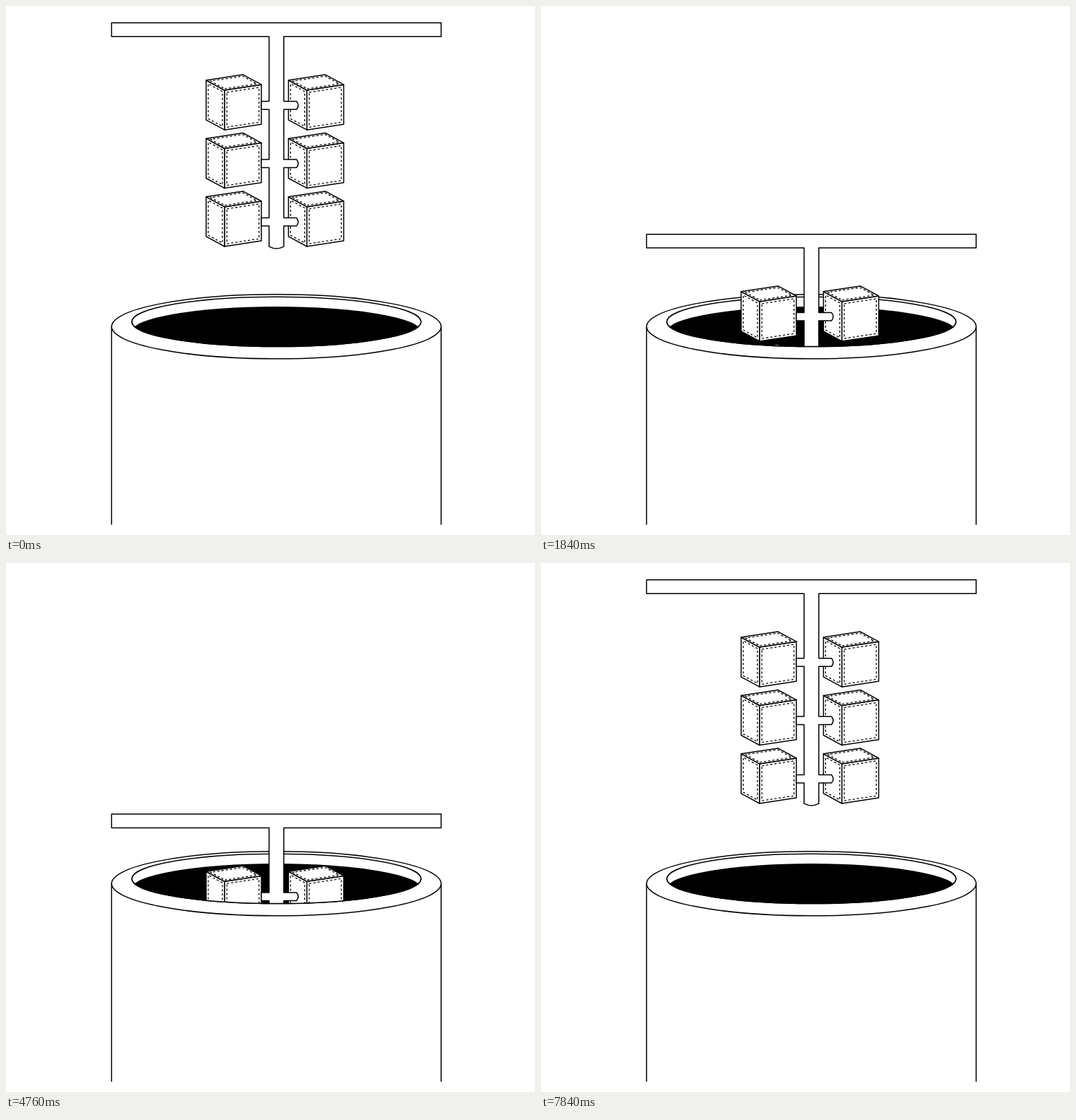
An HTML page for the animation above (9.04 s loop, 748 by 748 pixels).

```html
<!DOCTYPE html>
<html lang="en">
<head>
<meta charset="utf-8">
<title>Dipping rack</title>
<style>
  html, body { margin: 0; width: 100%; height: 100%; overflow: hidden; background: #fff; }
  svg { display: block; width: 100vw; height: 100vh; }
  .line { fill: #fff; stroke: #000; stroke-width: 1.5; stroke-linejoin: round; }
  .open { fill: none; stroke: #000; stroke-width: 1.5; }
  .stitch { fill: none; stroke: #000; stroke-width: 1.3; stroke-dasharray: 3 3; }
</style>
</head>
<body>
<svg viewBox="0 0 748 748">
  <defs>
    <clipPath id="mouth">
      <path d="M0 0H748V446.4H586.9A204.5 35.2 0 0 1 177.9 446.4H0Z"/>
    </clipPath>
    <clipPath id="inside"><ellipse cx="382.4" cy="446.4" rx="204.5" ry="35.2"/></clipPath>
    <g id="cube"></g>
  </defs>

  <path class="open" d="M149.3 453.3V733.5M615.3 453.3V733.5"/>
  <ellipse class="line" cx="382.3" cy="453.3" rx="233" ry="45.5"/>
  <ellipse class="line" cx="382.4" cy="446.4" rx="204.5" ry="35.2"/>
  <ellipse cx="382.4" cy="460.3" rx="204.5" ry="35.2" clip-path="url(#inside)"/>

  <g clip-path="url(#mouth)">
    <g id="rack"></g>
    <g id="drops"></g>
  </g>
  <path class="open" d="M586.9 446.4A204.5 35.2 0 0 1 177.9 446.4"/>
</svg>

<script>
const LOOP = 9040, TICK = 40, DEPTH = 383;
const RIPEN = 1100, GRAVITY = 7e-4, DRY = 7840;
const ROW = 82.4, COLUMN = 116.4, SEAM = 3.4;

const byId = id => document.getElementById(id);
const rack = byId("rack");

function make(tag, attrs, parent) {
  const el = document.createElementNS("http://www.w3.org/2000/svg", tag);
  for (const key in attrs) el.setAttribute(key, attrs[key]);
  return parent.appendChild(el);
}

// Each cube is three parallelograms sharing its near corner
const near = [309, 119.1], right = [52.1, -7.9], left = [-26, -14.1], down = [0, 56.1];

function face(a, b, inset) {
  const p = inset / Math.hypot(...a), q = inset / Math.hypot(...b);
  const at = (u, v) => near.map((n, i) => n + a[i] * u + b[i] * v);
  const corners = [at(p, q), at(1 - p, q), at(1 - p, 1 - q), at(p, 1 - q)];
  make("path", { class: inset ? "stitch" : "line", d: `M${corners.join("L")}Z` }, byId("cube"));
}

for (const [a, b] of [[right, down], [left, down], [right, left]]) {
  face(a, b, 0);
  face(a, b, SEAM);
}

const rows = [0, 1, 2].map(i => i * ROW);
for (const y of rows)
  for (const x of [0, COLUMN])
    make("use", { href: "#cube", x, y }, rack);

// Bar, pole and arms share one outline
const rightArms = rows.map(y => `V${134.7 + y}H410.8q4.8 5.75 0 11.5H392.8`).join("");
const leftArms = [...rows].reverse().map(y => `V${146.2 + y}H361V${134.7 + y}H372`).join("");
make("path", {
  class: "line",
  d: `M149.3 23.8H615.3V43.2H392.8${rightArms}V340.2q-10.4 5.6 -20.8 0${leftArms}V43.2H149.3Z`
}, rack);

// A drop hangs just above the lower edge of its cube
function hangAt(x, row) {
  const dx = x - near[0] - (x > 382 ? COLUMN : 0);
  const [ex, ey] = dx < 0 ? left : right;
  return near[1] + down[1] + dx * ey / ex + row * ROW - 5;
}

// x, row, release time, size; a negative row starts at the first cube's upper edge
const drops = [
  [291, 2, 5600], [338, -.64, 5730], [344.5, 1, 5735, 12], [471, 1, 5993],
  [460, 0, 6263], [438, 2, 6280], [293, 0, 6380], [444.3, 0, 6390, 21],
  [459, 2, 6460, 21], [338.5, 2, 6540], [301.5, 1, 6990]
].map(([x, row, release, size = 15]) => ({
  x, release, size, tip: hangAt(x, row),
  el: make("path", {
    d: "M0 0C.05 .2 .28 .45 .28 .7A.28 .28 0 0 1 -.28 .7C-.28 .45 -.05 .2 0 0Z",
    fill: "#fff", stroke: "#000"
  }, byId("drops"))
}));

// Slow start and stop: a cubic Bézier with flat ends
function ease(p) {
  if (p <= 0) return 0;
  if (p >= 1) return 1;
  let lo = 0, hi = 1, s;
  for (let i = 0; i < 30; i++) {
    s = (lo + hi) / 2;
    const x = 1.8 * (1 - s) ** 2 * s + 2 * (1 - s) * s * s + s ** 3;
    if (x < p) lo = s; else hi = s;
  }
  return s * s * (3 - 2 * s);
}

const depthAt = t => DEPTH * (ease((t - 170) / 2232) - ease((t - 4080) / 2000));

function drawDrop(d, t) {
  const size = d.size * Math.min(1, 1 + (t - d.release) / RIPEN);
  const fall = GRAVITY / 2 * Math.max(0, t - d.release) ** 2;
  const y = d.tip + depthAt(Math.min(t, d.release)) + fall;
  const shown = size > 0 && t < DRY && y < 482;
  d.el.style.display = shown ? "" : "none";
  if (!shown) return;
  d.el.setAttribute("transform", `translate(${d.x} ${y}) scale(${size})`);
  d.el.setAttribute("stroke-width", Math.min(1.4 / size, .1));
}

const start = performance.now();
function draw(now) {
  const t = Math.floor(Math.max(0, now - start) % LOOP / TICK) * TICK;
  rack.setAttribute("transform", `translate(0 ${depthAt(t)})`);
  for (const d of drops) drawDrop(d, t);
  requestAnimationFrame(draw);
}
draw(start);
</script>
</body>
</html>
```
